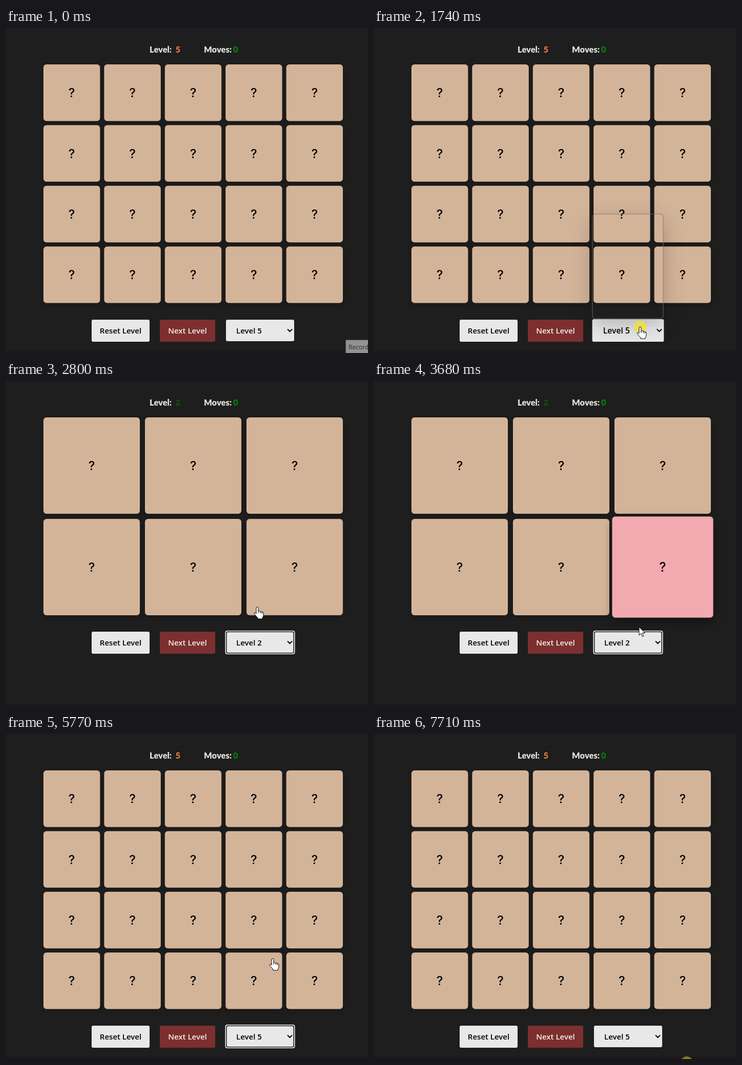
Animation of 706x634 px, one loop 7.73 s. Source, as an HTML page with a canvas:

```html
<!DOCTYPE html>
<html lang="en">
<head>
<meta charset="utf-8">
<title>Memory game</title>
<style>
html, body { margin: 0; width: 100%; height: 100%; overflow: hidden; background: #1e1e1e; }
canvas { display: block; }
</style>
</head>
<body>
<canvas id="stage" width="706" height="634"></canvas>
<script>
const ctx = document.getElementById('stage').getContext('2d');
const LOOP = 7730;
const UI = '"Open Sans", "Noto Sans", sans-serif';
const LABEL_FONT = '600 15px ' + UI;
const OPTIONS = ['Select Level', 'Level 1', 'Level 2', 'Level 3', 'Level 4', 'Level 5', 'Level 6'];
const ROW = 28.6;

// Pointer path: time, x, y
const PATH = [
  [220, 656, 640], [990, 534, 579], [1160, 534, 579], [1170, 533, 578],
  [1320, 533, 578], [1460, 519, 583], [2000, 519, 583], [2660, 490, 441],
  [3460, 490, 441], [3680, 517, 480], [4100, 559, 526], [5000, 559, 526],
  [5440, 520, 438], [5990, 520, 438], [6280, 536, 545], [6480, 589, 575],
  [6960, 621, 628], [7160, 621, 628], [7270, 615, 641], [7660, 610, 641]
];
const HAND = new Path2D('M-2 2Q-2 0 0 0Q2 0 2 2V8Q5 6 6 9Q8.5 7.5 9 10Q12 9 12 12V17Q12 19 10 21V23H1V21Q-2 18-6 13Q-6 10-3 11.5L-2 13Z');
const FINGERS = new Path2D('M2 8V12M6 9V12M9 10V13');
const ARROW = new Path2D('M0 0V16L4 12.5 6.5 18.5 9 17.5 6.5 11.5H11.5Z');

const within = (t, a, b) => t >= a && t < b;
const ease = u => u * u * (3 - 2 * u);
const ramp = (t, a, b) => ease(Math.min(1, Math.max(0, (t - a) / (b - a))));
const mix = (a, b, u) => a + (b - a) * u;

function pointer(t) {
  const i = PATH.findIndex(p => p[0] > t);
  if (i === 0) return [656, 660];
  if (i < 0) return PATH[PATH.length - 1].slice(1);
  const a = PATH[i - 1], b = PATH[i], u = ramp(t, a[0], b[0]);
  return [mix(a[1], b[1], u), mix(a[2], b[2], u)];
}

function box(x, y, w, h, r, fill) {
  ctx.beginPath();
  ctx.roundRect(x, y, w, h, r);
  ctx.fillStyle = fill;
  ctx.fill();
}

function text(str, x, y, font, color, align = 'left') {
  ctx.font = font;
  ctx.fillStyle = color;
  ctx.textAlign = align;
  ctx.fillText(str, x, y);
}

function shadow(dy, blur, alpha) {
  ctx.shadowColor = `rgba(0,0,0,${alpha})`;
  ctx.shadowOffsetY = dy;
  ctx.shadowBlur = blur;
}

function scaled(cx, cy, s, draw) {
  ctx.save();
  ctx.translate(cx, cy);
  ctx.scale(s, s);
  draw();
  ctx.restore();
}

function card(cx, cy, size, glow) {
  scaled(cx, cy, 1 + 0.05 * glow, () => {
    const rgb = [mix(212, 242, glow), mix(180, 170, glow), mix(153, 176, glow)];
    ctx.save();
    shadow(4 + 4 * glow, 8 + 10 * glow, 0.2 + 0.2 * glow);
    box(-size / 2, -size / 2, size, size, 6, `rgb(${rgb})`);
    ctx.restore();
    if (glow > 0) {
      ctx.strokeStyle = 'rgba(120,80,85,.55)';
      ctx.lineWidth = 1;
      ctx.stroke();
    }
    text('?', 0, 9, '500 24px Inter, sans-serif', '#000', 'center');
  });
}

function select(level, cy, hover, focused) {
  scaled(495.5, cy, 1 + 0.05 * hover, () => {
    if (focused) {
      box(-68, -23, 136, 46, 4, '#fff');
      box(-66.5, -21.5, 133, 43, 3, '#101010');
      box(-65, -20, 130, 40, 2, '#e7e8e7');
    } else box(-66.5, -21, 133, 42, 3, '#e7e8e7');
    text('Level ' + level, -46.5, 6, LABEL_FONT, '#000');
    ctx.beginPath();
    ctx.moveTo(53.5, -2.5);
    ctx.lineTo(58, 2);
    ctx.lineTo(62.5, -2.5);
    ctx.strokeStyle = '#000';
    ctx.lineWidth = 2;
    ctx.stroke();
  });
}

function popup(bottom, alpha, filled, level, y) {
  const x = 426, w = 138, h = 204, top = bottom - h;
  ctx.save();
  ctx.globalAlpha = alpha;
  // Shadow falls only outside the list
  ctx.save();
  ctx.beginPath();
  ctx.rect(0, 0, 706, 634);
  ctx.roundRect(x, top, w, h, 6);
  ctx.clip('evenodd');
  shadow(12, 40, 0.3);
  box(x, top, w, h, 6, '#000');
  ctx.restore();
  if (filled) {
    box(x, top, w, h, 6, '#e7e8e7');
    const hovered = Math.floor((y - top - 2) / ROW);
    const active = hovered >= 0 && hovered < OPTIONS.length ? hovered : level + 1;
    OPTIONS.forEach((name, i) => {
      const ry = top + 2 + i * ROW;
      if (i === active) box(x + 1, ry, w - 2, ROW, 2, '#1967d2');
      text(name, 447, ry + 19.5, LABEL_FONT, i === active ? '#fff' : '#000');
    });
  }
  ctx.beginPath();
  ctx.roundRect(x, top, w, h, 6);
  ctx.strokeStyle = 'rgba(125,115,112,.75)';
  ctx.lineWidth = 1.5;
  ctx.stroke();
  ctx.restore();
}

function drawPointer(x, y, hand) {
  ctx.save();
  ctx.translate(x, y);
  ctx.fillStyle = '#fff';
  ctx.strokeStyle = '#000';
  ctx.lineWidth = 1;
  const shape = hand ? HAND : ARROW;
  ctx.fill(shape);
  ctx.stroke(shape);
  if (hand) ctx.stroke(FINGERS);
  ctx.restore();
}

function draw(t) {
  const small = within(t, 2800, 5710);
  const level = small ? 2 : 5;
  const [cols, rows, size, gap] = small ? [3, 2, 188, 10] : [5, 4, 110.4, 8];
  const cy = small ? 510 : 590;
  const [px, py] = pointer(t);
  const glow = small
    ? ramp(t, 2790, 3100) - ramp(t, 3690, 4000)
    : ramp(t, 5755, 6060) - ramp(t, 6260, 6480);
  const hot = small ? 5 : 18;

  ctx.fillStyle = '#1e1e1e';
  ctx.fillRect(0, 0, 706, 634);
  ctx.fillStyle = '#21171b';
  ctx.fillRect(0, 630, 706, 4);

  const head = '900 16.5px Lato, sans-serif';
  text('Level:', 280, 48, head, '#e4e2dd');
  text(level, 330.5, 48, head, small ? '#124d12' : '#e07a45');
  text('Moves:', 386, 48, head, '#e4e2dd');
  text('0', 443, 48, head, '#078007');

  let overCard = false;
  const drawCard = (i, g) => {
    const x = 73 + (i % cols) * (size + gap), y = 71 + Math.floor(i / cols) * (size + gap);
    overCard ||= within(px, x, x + size) && within(py, y, y + size);
    card(x + size / 2, y + size / 2, size, g);
  };
  for (let i = 0; i < cols * rows; i++) if (i !== hot) drawCard(i, 0);
  drawCard(hot, glow);

  box(167, cy - 21, 113, 43, 3, '#e7e8e7');
  text('Reset Level', 223.5, cy + 6, LABEL_FONT, '#000', 'center');
  box(300, cy - 21, 108, 43, 3, '#7d2f2f');
  text('Next Level', 354, cy + 6, LABEL_FONT, '#f3efe8', 'center');

  const hover = small ? ramp(t, 3860, 4100) : t < 2800 ? ramp(t, 720, 990) : 0;
  select(level, cy, hover, within(t, 2800, 7660));

  const opened = small ? 4490 : 1660;
  const open = within(t, opened, small ? 5710 : 2800);
  if (open) {
    popup(cy - 23, ramp(t, opened, opened + 120), t >= opened + 120, level, py);
  }

  const click = within(t, 1660, 1790) || within(t, 4510, 4740) ? 0.8 : t >= 7660 ? 0.5 : 0;
  if (click) {
    ctx.beginPath();
    ctx.arc(px, py, 12, 0, Math.PI * 2);
    ctx.fillStyle = `rgba(235,228,50,${click})`;
    ctx.fill();
  }

  const overSelect = within(px, 427, 566) && within(py, cy - 23, cy + 23);
  drawPointer(px, py, overSelect || (overCard && !open));

  if (t < 60) {
    ctx.globalAlpha = t < 20 ? 1 : 0.4;
    box(662, 608, 50, 30, 0, '#5e4542');
    box(663, 609, 50, 30, 0, '#929292');
    text('Record', 668, 627, '12px ' + UI, '#2c2c2c');
    ctx.globalAlpha = 1;
  }
}

const start = performance.now();
function tick() {
  draw((performance.now() - start) % LOOP);
  requestAnimationFrame(tick);
}
tick();
</script>
</body>
</html>
```
